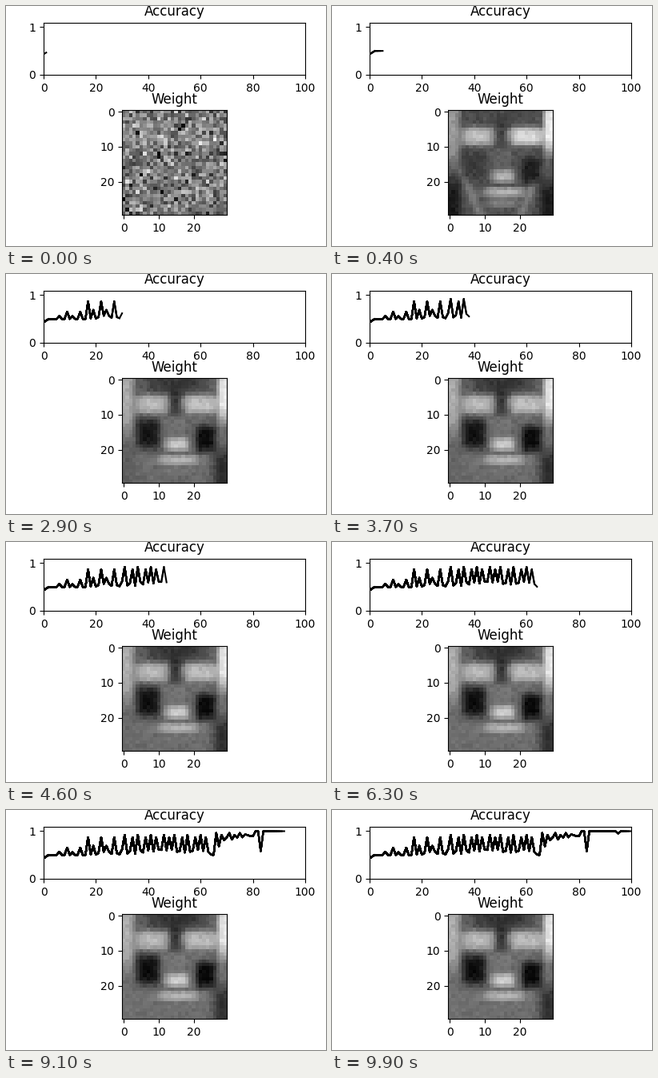
Animation, 400 px wide and 300 px high, one loop 10000 ms. Source, as a matplotlib script:

```python
import numpy as np
import matplotlib.pyplot as plt
from matplotlib.animation import FuncAnimation

W, H, DPI = 400, 300, 100
FRAMES, SIZE = 100, 30

rng = np.random.default_rng(4)
row, col = np.mgrid[0:SIZE, 0:SIZE].astype(float)
noise = np.clip(0.5 + 0.17 * rng.standard_normal((SIZE, SIZE)), 0, 1)
grain = 0.02 * rng.standard_normal((SIZE, SIZE))

# tone before and after training, then centre (col, row) and half size
PATCHES = [
    (0.08, 0.44, 0, 27, 3.5, 8),        # lower corners
    (0.10, 0.20, 29, 27, 3.5, 7),
    (0.60, 0.68, 0, 5, 3, 10),          # bright sides
    (0.95, 0.90, 29, 4, 2.2, 8),
    (0.28, 0.20, 15, 0, 9, 4),          # dark top and centre
    (0.24, 0.20, 15, 6, 2.2, 5),
    (0.76, 0.72, 8, 7, 4.8, 2.6),       # upper lights
    (0.88, 0.74, 22, 7, 5.2, 2.6),
    (0.22, 0.05, 7, 15.5, 3.5, 4.5),    # side shadows
    (0.10, 0.03, 23.5, 17, 3, 4),
    (0.38, 0.46, 15, 14, 3, 4),         # middle column
    (0.70, 0.80, 15.3, 18.5, 3.3, 1.8),
    (0.70, 0.70, 15.5, 23, 6, 1.3),
    (0.50, 0.44, 15, 26, 4.5, 1.4),
]


def patch(c, r, w, h):
    """Rounded rectangle with soft edges."""
    return np.exp(-((col - c) / w) ** 4 - ((row - r) / h) ** 4)


# two slanted bands closing in towards the bottom
slant = abs(col - 14.5) - 11.5 + 0.42 * (row - 16)
bands = np.exp(-slant ** 2 / 2) / (1 + np.exp(16 - row))


def weights(i):
    trained = 1 - np.exp(-max(i - 4, 0) / 16)
    img = np.full((SIZE, SIZE), 0.31 + 0.11 * trained)
    img += (0.48 - img) * bands * (1 - 0.7 * trained)
    for before, after, *shape in PATCHES:
        tone = before + (after - before) * trained
        img += (tone - img) * patch(*shape)
    return img + grain + (noise - img) * 0.9 * 0.45 ** i


def accuracy():
    """Zigzag from a slowly rising floor up to alternating peaks."""
    x = np.arange(FRAMES + 1)
    acc = np.interp(x, [0, 2, 65, 69, 81], [0.43, 0.5, 0.5, 0.74, 0.88])
    acc += np.interp(x, [16, 28], [0, 0.12]) * rng.random(x.size)

    def peaks(start, stop, gap, even, odd):
        at = np.arange(start, stop, gap).astype(int)
        acc[at[::2]], acc[at[1::2]] = even, odd

    peaks(6.6, 16, 2.6, 0.56, 0.65)
    peaks(17, 28, 2.6, 0.87, 0.69)
    peaks(31.9, 63, 2.38, 0.92, 0.87)
    peaks(66.3, 80, 2.4, 0.96, 0.92)
    acc[81:] = 1
    acc[[83, 95]] = 0.58, 0.95
    return acc


def add_axes(x, y, w, h, title):
    ax = fig.add_axes([x / W, y / H, w / W, h / H])
    ax.set_title(title)
    return ax


fig = plt.figure(figsize=(W / DPI, H / DPI), dpi=DPI)

top = add_axes(47, 214.2, 327, 65.25, "Accuracy")
top.set(xlim=(0, 100), ylim=(0, 1.1), yticks=[0, 1])
# every step redraws the whole curve on top of the previous ones
history = accuracy()
curves = [top.plot(history[:n + 2], "k")[0] for n in range(FRAMES)]

bottom = add_axes(145.2, 39, 131, 131, "Weight")
picture = bottom.imshow(noise, cmap="gray", vmin=0, vmax=1,
                        interpolation="nearest")
bottom.set(xticks=[0, 10, 20], yticks=[0, 10, 20])


def update(i):
    for n, curve in enumerate(curves):
        curve.set_visible(n <= i)
    picture.set_data(weights(i))


anim = FuncAnimation(fig, update, frames=FRAMES, interval=100, repeat=True)
plt.show()
```
